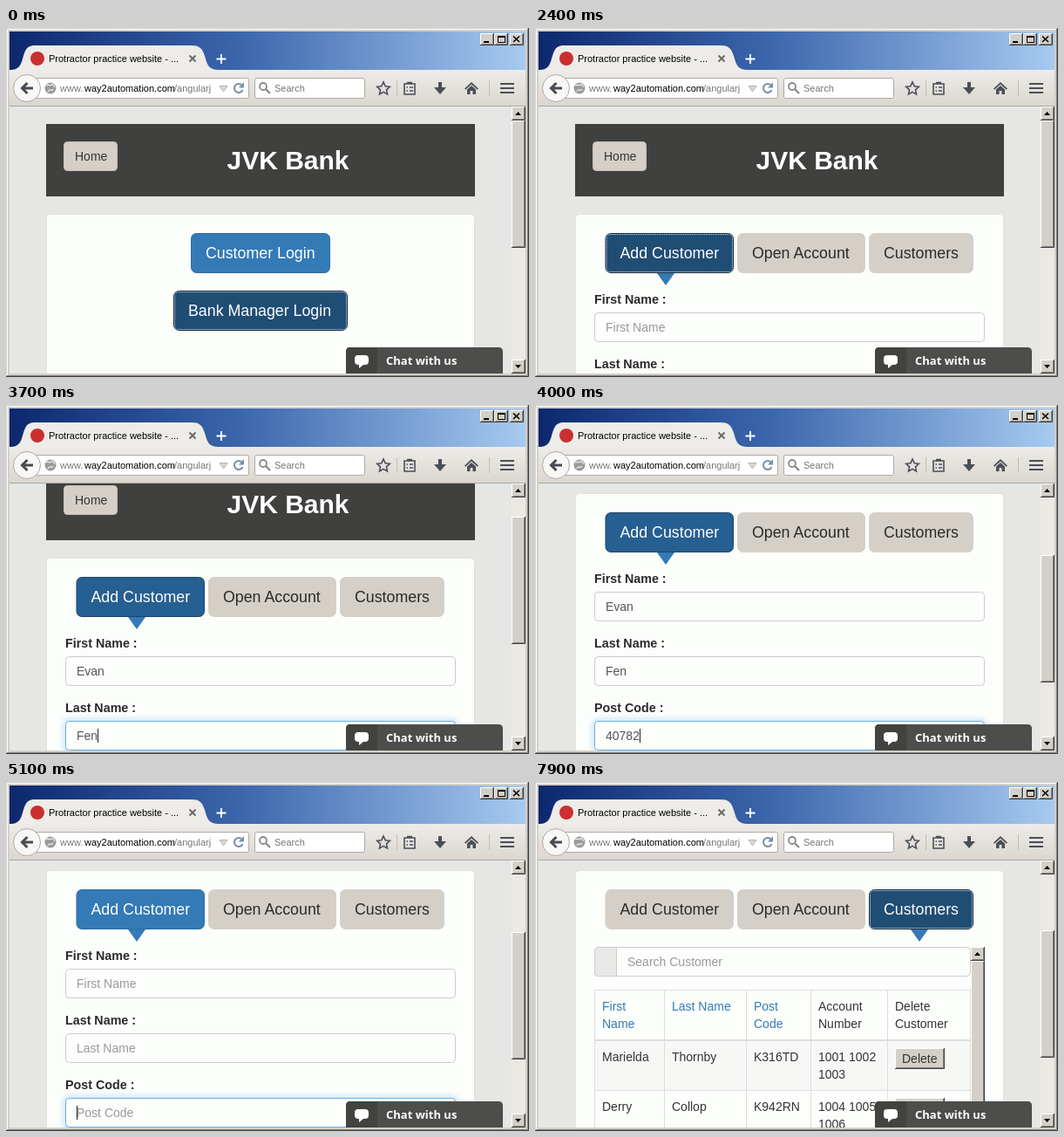
These frames come from a looping animation (600x400 px, 8000 ms). An HTML page:

```html
<!DOCTYPE html>
<html lang="en">
<head>
<meta charset="utf-8">
<title>Bank manager test run</title>
<style>
html, body { margin: 0; width: 100%; height: 100%; overflow: hidden; background: #d4d0c8; }
svg { display: block; width: 600px; height: 400px; }
text { font-family: "Liberation Sans", Arial, sans-serif; white-space: pre; }
.ui { font-size: 11px; }
.chat { font: bold 13px "Noto Sans", sans-serif; }
</style>
</head>
<body>
<svg viewBox="0 0 600 400" xmlns="http://www.w3.org/2000/svg">
  <defs>
    <linearGradient id="sky" x1="0" y1="0" x2="1" y2="0">
      <stop offset="0" stop-color="#0c286e"/><stop offset=".45" stop-color="#3c67ad"/><stop offset="1" stop-color="#a6caf0"/>
    </linearGradient>
    <linearGradient id="bar" x1="0" y1="0" x2="0" y2="1">
      <stop offset="0" stop-color="#eeece8"/><stop offset="1" stop-color="#dad7d0"/>
    </linearGradient>
    <filter id="glow" x="-5%" y="-50%" width="110%" height="200%"><feGaussianBlur stdDeviation="3"/></filter>
    <clipPath id="view"><rect x="4" y="90" width="576" height="306"/></clipPath>
  </defs>

  <rect width="600" height="400" fill="#d4d0c8"/>
  <path d="M1.500 398V1.500H598" fill="none" stroke="#fff"/>
  <path d="M1 398.500H598.500V1" fill="none" stroke="#808080"/>
  <path d="M0 399.500H599.500V0" fill="none" stroke="#404040"/>
  <rect x="4" y="4" width="592" height="44" fill="url(#sky)"/>
  <rect x="4" y="48" width="592" height="42" fill="url(#bar)"/>
  <path d="M4 89.500H596" stroke="#aaa69e"/>
  <path d="M4 48C16 48 17 42 20 32C23 22 26 20 34 20H213C222 20 225 23 228 32C231 43 233 48 244 48Z" fill="#eeece8"/>
  <circle cx="36" cy="35" r="8" fill="#c9302f"/>
  <text class="ui" x="49" y="39" fill="#000">Protractor practice website - ...</text>
  <path d="M210.500 31.500L217.500 38.500M217.500 31.500L210.500 38.500" stroke="#666" stroke-width="1.800"/>
  <path d="M241.500 35.500H252.500M247 30V41" stroke="#fff" stroke-width="2"/>
  <g id="winbtns"></g>

  <rect x="30.500" y="57.500" width="248" height="23" rx="2" fill="#fff" stroke="#aeaaa3"/>
  <circle cx="24" cy="69" r="15.500" fill="#f8f7f5" stroke="#aeaaa3"/>
  <path d="M31 69H19M24.500 63L18.500 69L24.500 75" fill="none" stroke="#474b52" stroke-width="3"/>
  <circle cx="51" cy="69" r="6.500" fill="#9a9a9a"/>
  <path d="M46 66C49 64 50 67 52 65S55 68 56 67M48 73C50 69 53 73 54 70" fill="none" stroke="#e4e4e4" stroke-width="1.500"/>
  <g class="ui">
    <text x="62" y="73" fill="#777">www.</text>
    <text x="90" y="73" fill="#000">way2automation.com</text>
    <text x="193" y="73" fill="#777">/angularj</text>
  </g>
  <path d="M245 66.500H254L249.500 73Z" fill="#d8d8d8" stroke="#b4b4b4"/>
  <path d="M271 66A5 5 0 1 0 271.500 71" fill="none" stroke="#7990ad" stroke-width="2"/>
  <path d="M273 62V68.500H267Z" fill="#7990ad"/>
  <rect x="285.500" y="57.500" width="126" height="23" rx="2" fill="#fff" stroke="#aeaaa3"/>
  <circle cx="295" cy="67" r="4" fill="none" stroke="#888" stroke-width="1.800"/>
  <path d="M298 70L303 75" stroke="#888" stroke-width="2.200"/>
  <text class="ui" x="308" y="73" fill="#777">Search</text>
  <g fill="none" stroke="#4a4f57" stroke-width="1.600">
    <path d="M433 62L435.200 66.700L440.300 67.300L436.500 70.800L437.500 76L433 73.400L428.500 76L429.500 70.800L425.700 67.300L430.800 66.700Z"/>
    <path d="M457 64H469V76H457ZM460 62.500H466M459.500 68H461M463 68H467M459.500 72H461M463 72H467"/>
    <path d="M567 64H583M567 69H583M567 74H583" stroke-width="2"/>
  </g>
  <path d="M448.500 60V78M554.500 60V78" stroke="#c2beb6"/>
  <path d="M496 62H500V68H505L498 76L491 68H496Z" fill="#4a4f57"/>
  <path d="M534 62L542 69.500L540.800 70.700L534 64.500L527.200 70.700L526 69.500Z M529 70.500L534 66L539 70.500V76H535.500V72H532.500V76H529Z" fill="#4a4f57"/>

  <g clip-path="url(#view)">
    <rect x="4" y="90" width="576" height="306" fill="#e6e7e5"/>
    <g id="page"></g>
  </g>
  <path d="M390 396V371Q390 366 395 366H565Q570 366 570 371V396Z" fill="#4d4d4b"/>
  <path d="M390 396V371Q390 366 395 366H426V396Z" fill="#42423f"/>
  <path d="M404 375H412Q416 375 416 379V382Q416 386 412 386H410L405 390V386H404Q400 386 400 382V379Q400 375 404 375Z" fill="#fff"/>
  <text class="chat" x="436" y="386" fill="#fff">Chat with us</text>
  <g id="scroll"></g>
</svg>
<script>
const LOOP = 8000, STEP = 100;
const BLUE = '#337ab7', HOVER = '#265f91', DARK = '#204d74', GREY = '#d4d0c8', PAPER = '#fcfefb';
const EDGE = { [GREY]: GREY, [BLUE]: '#2e6da4', [HOVER]: '#1b4467', [DARK]: '#122b40' };
const $ = id => document.getElementById(id);
const pen = document.createElement('canvas').getContext('2d');
pen.font = '14px "Liberation Sans", Arial, sans-serif';

const text = (x, y, s, fill = '#333', size = 14, more = '') =>
  `<text x="${x}" y="${y}" fill="${fill}" font-size="${size}" ${more}>${s}</text>`;
const rect = (x, y, w, h, fill, more = '') =>
  `<rect x="${x}" y="${y}" width="${w}" height="${h}" fill="${fill}" ${more}/>`;
const box = (x, y, w, h, fill, stroke, r = 4) =>
  rect(x + .5, y + .5, w - 1, h - 1, fill, `stroke="${stroke}" rx="${r}"`);
const path = (d, stroke, fill = 'none') => `<path d="${d}" fill="${fill}" stroke="${stroke}"/>`;

// Raised classic control
const bevel = (x, y, w, h) => rect(x, y, w, h, GREY) +
  path(`M${x + .5} ${y + h - 1}V${y + .5}H${x + w - 1}`, '#fff') +
  path(`M${x + 1.5} ${y + h - 1.5}H${x + w - 1.5}V${y + 1}`, '#808080') +
  path(`M${x} ${y + h - .5}H${x + w - .5}V${y}`, '#404040');

const arrow = (x, y, dir) => path(`M${x - 3.5} ${y - 2 * dir}H${x + 3.5}L${x} ${y + 2 * dir}Z`, 'none', '#000');

function button(x, y, w, label, fill, focus) {
  return box(x, y, w, 46, fill, EDGE[fill], 6) +
    (focus ? rect(x + 1.5, y + 1.5, w - 3, 43, 'none', 'rx="4" stroke="#e8eef4" stroke-dasharray="1 1"') : '') +
    text(x + 17, y + 29, label, fill === GREY ? '#2a2a2a' : '#fff', 17.8);
}

function field(y, label, hint, value, focus, caret) {
  const cx = Math.round(81 + pen.measureText(value).width) + .5;
  return text(68, y - 10, label + ' :', '#2a2a2a', 14.3, 'font-weight="bold"') +
    (focus ? rect(68, y, 448, 34, 'none', 'rx="4" stroke="#66afe9" stroke-width="3" filter="url(#glow)" opacity=".6"') : '') +
    box(68, y, 448, 34, PAPER, focus ? '#66afe9' : '#ccc') +
    text(81, y + 22, value || hint, value ? '#555' : '#999') +
    (caret ? path(`M${cx} ${y + 9}V${y + 25}`, '#222') : '');
}

const lines = (x, y, list, fill) => list.map((s, i) => text(x, y + 20 * i, s, fill)).join('');

const COLS = [68, 148, 242, 316, 404];
const HEADS = [['First', 'Name'], ['Last Name'], ['Post', 'Code'], ['Account', 'Number'], ['Delete', 'Customer']];
const ROWS = [
  [['Marielda'], ['Thornby'], ['K316TD'], ['1001 1002', '1003']],
  [['Derry'], ['Collop'], ['K942RN'], ['1004 1005', '1006']]
];

function table() {
  let s = rect(68, 301, 432, 34, PAPER, 'rx="4"') + rect(68, 301, 26, 34, '#e9eae8', 'rx="4"') +
    box(68, 301, 432, 34, 'none', '#ccc') + path('M93.5 301V335', '#ccc') + text(106, 323, 'Search Customer', '#999');
  s += rect(68, 350, 432, 57, PAPER) + rect(68, 408, 432, 57, '#f7f8f6');
  HEADS.forEach((h, i) => s += lines(COLS[i] + 9, 374, h, i < 3 ? BLUE : '#333'));
  ROWS.forEach((row, r) => {
    const y = 408 + 57 * r;
    row.forEach((c, i) => s += lines(COLS[i] + 9, y + 24, c));
    s += bevel(413, y + 9, 57, 24) + text(421, y + 26, 'Delete');
  });
  s += path('M68 350.5H500M68 465.5H500', '#ddd') + rect(68, 407, 432, 2, '#ddd');
  [...COLS, 499].forEach(x => s += path(`M${x + .5} 350V520`, '#ddd'));
  return s + bevel(500, 301, 16, 16) + arrow(507.5, 309, -1) + bevel(500, 317, 16, 230);
}

function form(t, focus) {
  const first = t < 4900 ? 'Evan'.slice(0, Math.max(0, (t - 2900) / STEP)) : '';
  const last = t >= 3700 && t < 4900 ? 'Fen' : '';
  const post = t >= 3900 && t < 4900 ? '40782'.slice(0, t < 4000 ? 3 : 5) : '';
  return field(326, 'First Name', 'First Name', first, focus === 1, focus === 1 && t < 3500) +
    field(400, 'Last Name', 'Last Name', last, focus === 2, focus === 2) +
    field(474, 'Post Code', 'Post Code', post, focus === 3, focus === 3);
}

function tabs(t) {
  const list = t >= 5800;
  const add = t < 2000 || list ? GREY : t < 3700 ? DARK : t < 4500 ? HOVER : BLUE;
  const tip = x => path(`M${x - 10} 281H${x + 10}L${x} 295Z`, 'none', BLUE);
  return button(80.5, 235, 147.5, 'Add Customer', add, t >= 2000 && t < 2900) +
    button(232, 235, 147, 'Open Account', GREY) +
    button(383, 235, 120, 'Customers', list ? DARK : GREY, list) +
    (list ? tip(441) : t >= 2000 ? tip(150) : '');
}

function body(t) {
  if (t < 100) return button(212, 235, 160, 'Customer Login', BLUE) +
    button(192, 301, 200, 'Bank Manager Login', DARK, true);
  if (t < 2000) return tabs(t);
  if (t >= 5800) return tabs(t) + table();
  return tabs(t) + form(t, t < 2900 ? 0 : t < 3700 ? 1 : t < 3900 ? 2 : 3);
}

function page(t, top) {
  return `<g transform="translate(0 ${-top})">` +
    rect(46, 110, 492, 83, '#40413e') + box(66, 130, 62, 34, GREY, '#c4c0b8') + text(79, 152, 'Home') +
    text(323.5, 162, 'JVK Bank', '#fff', 30, 'font-weight="bold" text-anchor="middle"') +
    box(46, 213, 492, 500, PAPER, '#e1e2df') + body(t) + '</g>';
}

function scrollbar(y) {
  return rect(580, 90, 16, 306, '#ebe9e4') + bevel(580, 90, 16, 16) + arrow(587.5, 98, -1) +
    bevel(580, 380, 16, 16) + arrow(587.5, 388, 1) + bevel(580, y, 16, 146);
}

$('winbtns').innerHTML = [544, 560, 578].map(x => bevel(x, 6, 16, 14)).join('') +
  rect(548, 15, 6, 2, '#000') + path('M564.5 9V16.5H572.5V9M564 9.5H573M564 10.5H573', '#000') +
  '<path d="M582 9.500L589 16M589 9.500L582 16" stroke="#000" stroke-width="1.600"/>';

let shown = -1;
function draw(now) {
  const t = Math.floor(now % LOOP / STEP) * STEP;
  if (t !== shown) {
    shown = t;
    const top = t < 3700 ? 0 : t < 3900 ? 38 : 112;
    $('page').innerHTML = page(t, top);
    $('scroll').innerHTML = scrollbar(t >= 5800 ? 170 : 106 + Math.round(top * 66 / 112));
  }
}
const start = performance.now();
function tick() {
  draw(performance.now() - start);
  requestAnimationFrame(tick);
}
tick();
</script>
</body>
</html>
```
